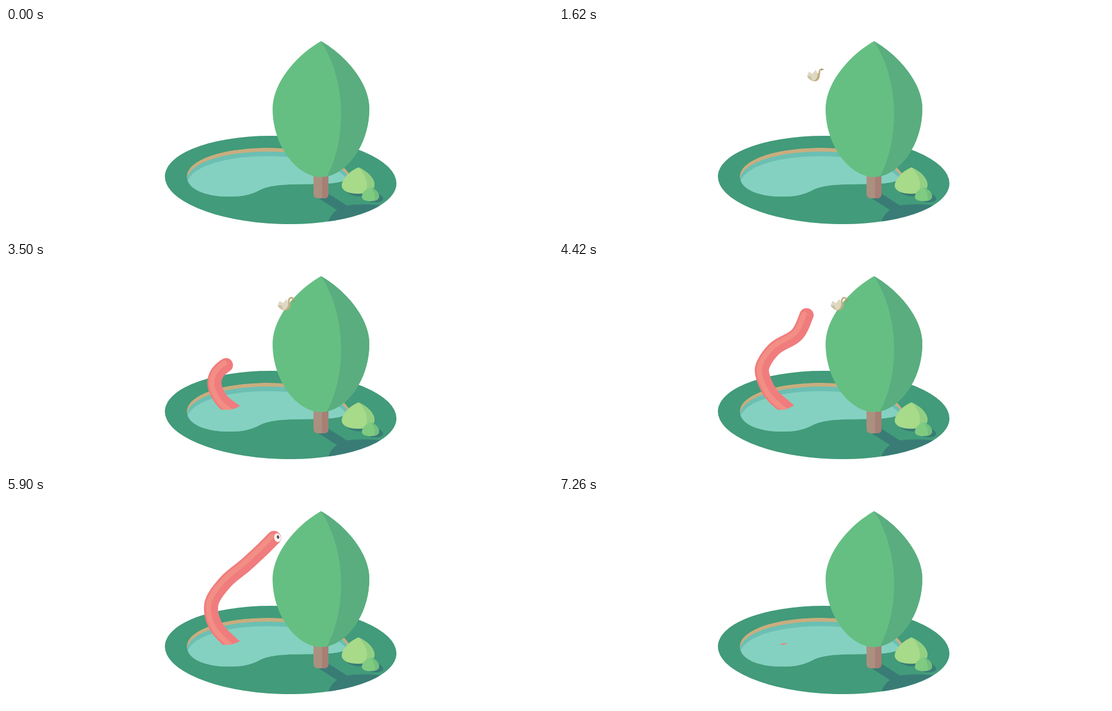
Recreate the animation shown at these times as an HTML page. Size 950 by 361 pixels, loop 7.3 s.

```html
<!DOCTYPE html>
<html lang="en">
<head>
<meta charset="utf-8">
<title>Pond</title>
<style>
  html, body { margin: 0; width: 100%; height: 100%; overflow: hidden; background: #fff; }
  svg { display: block; width: 950px; height: 361px; }
  .line { fill: none; stroke-linecap: round; stroke-linejoin: round; }
</style>
</head>
<body>
<svg viewBox="0 0 950 361">
  <defs>
    <ellipse id="ground" cx="477" cy="265" rx="201.2" ry="76.8" transform="rotate(2 477 265)"/>
    <path id="pond" d="M314 260C314 230 375 209 455 209C530 209 580 226 597 256C598 268 570 271.5 545 272L500 272.5C460 274 450 278 440 283C425 291 410 294 388 294C345 294 316 281 314 260Z"/>
    <path id="crown" d="M547 23C505 47 463 95 463 141C463 205 505 260 547 260C589 260 631 205 631 141C631 95 589 47 547 23Z"/>
    <path id="bigBush" d="M612 243C596 250 583 263 583 276C585 285 596 289 611 289C628 289 640 284 640 273C639 261 628 250 612 243Z"/>
    <path id="smallBush" d="M633 278C624 281 618 288 618 295C619 300 625 302 633 302C642 302 648 299 648 294C648 287 642 281 633 278Z"/>
    <clipPath id="inGround"><use href="#ground"/></clipPath>
    <clipPath id="inPond"><use href="#pond"/></clipPath>
    <clipPath id="inCrown"><use href="#crown"/></clipPath>
    <clipPath id="inBig"><use href="#bigBush"/></clipPath>
    <clipPath id="inSmall"><use href="#smallBush"/></clipPath>
    <clipPath id="aboveWater"><path d="M0 0H950V200L425 235Q408 252 390 256H376Q366 254 350 236L0 200Z"/></clipPath>
  </defs>

  <use href="#ground" fill="#429b7a"/>
  <g clip-path="url(#inPond)">
    <use href="#pond" fill="#c9ad7e"/>
    <use href="#pond" y="6.5" fill="#6bbfb3"/>
    <use href="#pond" y="14.5" fill="#84d1c1"/>
  </g>
  <g clip-path="url(#inGround)" fill="#397c76">
    <path d="M543 297L560 289L592 309.5C610 307 640 306 665 312L650 350L558 345C560 333 566 323 575 317.5Z"/>
    <path d="M590 285C600 294 615 295 626 292L632 303C648 306 656 302 655 297C653 292 648 289 640 285Z"/>
  </g>

  <path d="M534 250H560V289Q560 297 552 297H542Q534 297 534 289Z" fill="#ab9080"/>
  <path d="M549 250H560V289Q560 297 552 297H549Z" fill="#a67f75"/>
  <use href="#crown" fill="#65bf82"/>
  <path clip-path="url(#inCrown)" d="M547 23C568 55 582 100 582 150C582 195 571 235 556 261H640V23Z" fill="#5aad7f"/>

  <use href="#bigBush" fill="#a7da89"/>
  <path clip-path="url(#inBig)" d="M612 243C622 252 627 264 627 274L625 290H645V243Z" fill="#92cf83"/>
  <use href="#smallBush" fill="#7fcb81"/>
  <path clip-path="url(#inSmall)" d="M633 278C639 284 642 293 640 303H650V278Z" fill="#72bf7d"/>

  <g id="bird">
    <path d="M-13 2L9 -4C10 6 6 11 0 11C-7 10 -10 7 -13 2Z" fill="#bfac82"/>
    <path id="neck" class="line" stroke="#c4b189" stroke-width="3"/>
    <path id="beak" d="M-1 -2L5 -.5L0 1.8Z" fill="#a88d60"/>
    <path id="wing" d="M-13 2L-10 -6L-4 -2L2 -9L5 -3C6 3 3 8 -1 10C-7 9 -11 6 -13 2Z" fill="#ded8c3"/>
    <path d="M-13 2L-7 2L-4 8C-8 8 -11 6 -13 2Z" fill="#cbbf9f"/>
  </g>

  <g clip-path="url(#aboveWater)">
    <g id="worm">
      <path id="body" class="line" stroke="#f07c7d" stroke-width="24.5"/>
      <path id="shine" class="line" stroke="#f28e84" stroke-width="9"/>
      <g id="eye">
        <ellipse rx="5.6" ry="7.6" fill="#fff"/>
        <ellipse cx="1.2" cy="-.8" rx="2.2" ry="3.2" fill="#5c5656"/>
      </g>
    </g>
  </g>
</svg>
<script>
const LOOP = 7300, STEP = 40;
const $ = id => document.getElementById(id);
const [bird, neck, beak, wing, worm, body, shine, eye] =
  ['bird', 'neck', 'beak', 'wing', 'worm', 'body', 'shine', 'eye'].map($);
const clamp = v => Math.min(1, Math.max(0, v));
const mix = (a, b, k) => a + (b - a) * k;
const mixPoint = (a, b, k) => [mix(a[0], b[0], k), mix(a[1], b[1], k)];
const toPath = pts => 'M' + pts.map(p => p[0].toFixed(2) + ' ' + p[1].toFixed(2)).join('L');

// Worm centre lines, water to head
const TAIL = [410, 267];
const sunk = y => Array.from({ length: 7 }, () => [393, y]);
const coiled = [[392, 252], [357, 218], [341, 175], [356, 138], [402, 112], [434, 84], [426, 38]];
const strike = [[392, 252], [362, 220], [353, 178], [380, 140], [420, 112], [456, 88], [493, 72]];
const poses = [
  [2640, sunk(270)],
  [3500, [[392, 254], [377, 242], [367, 227], [362, 211], [364, 198], [371, 187], [382, 178]]],
  [4420, [[394, 252], [369, 229], [354, 198], [355, 176], [376, 148], [413, 125], [430, 91]]],
  [5300, coiled],
  [5500, coiled],
  [5700, strike],
  [5780, strike],
  [6180, [[387, 253], [368, 228], [366, 198], [383, 163], [405, 130], [412, 102], [401, 64]]],
  [6260, [[386, 253], [373, 232], [370, 207], [382, 173], [400, 146], [407, 114], [399, 82]]],
  [6940, [[392, 255], [387, 248], [385, 241], [384, 234], [384, 226], [385, 218], [386, 211]]],
  [7260, sunk(265.5)],
  [7300, sunk(272)]
];

function poseAt(t) {
  const i = poses.findIndex(p => p[0] > t);
  const [t0, a] = poses[i - 1], [t1, b] = poses[i];
  const k = (t - t0) / (t1 - t0);
  return a.map((p, j) => mixPoint(p, b[j], k));
}

// Catmull-Rom samples
function spline(pts) {
  const out = [], at = i => pts[Math.min(pts.length - 1, Math.max(0, i))];
  for (let i = 0; i < pts.length - 1; i++) {
    const [a, b, c, d] = [at(i - 1), at(i), at(i + 1), at(i + 2)];
    for (let s = 0; s < 10; s++) {
      const u = s / 10;
      out.push([0, 1].map(n => b[n] + u / 2 * (c[n] - a[n]
        + u * (2 * a[n] - 5 * b[n] + 4 * c[n] - d[n]
        + u * (3 * (b[n] - c[n]) + d[n] - a[n])))));
    }
  }
  out.push(at(pts.length - 1));
  return out;
}

function offset(pts, dist) {
  return pts.map((p, i) => {
    const a = pts[Math.max(0, i - 1)], b = pts[Math.min(pts.length - 1, i + 1)];
    const dx = b[0] - a[0], dy = b[1] - a[1], len = Math.hypot(dx, dy) || 1;
    return [p[0] + dy / len * dist, p[1] - dx / len * dist];
  });
}

function drawWorm(t) {
  const shown = t >= poses[0][0];
  worm.style.display = shown ? '' : 'none';
  if (!shown) return;
  const pts = poseAt(t), line = spline([TAIL, ...pts]), head = pts[6];
  body.setAttribute('d', toPath(line));
  shine.setAttribute('d', toPath(offset(line, 4.5)));
  const open = clamp((t - 4700) / 200);
  eye.setAttribute('transform', `translate(${head[0] + 6} ${head[1] - .5}) rotate(-12) scale(${open})`);
}

function drawBird(t) {
  const shown = t >= 900 && t < 5700;
  bird.style.display = shown ? '' : 'none';
  if (!shown) return;
  const fly = 1 - Math.pow(1 - clamp((t - 900) / 1000), 1.378);
  bird.setAttribute('transform', `translate(${mix(248, 485, fly)} ${mix(95, 72, fly ** 3)})`);

  const flap = t < 1900 ? Math.sin((t - 1620) / 240 * 2 * Math.PI) * .5 : 0;
  wing.setAttribute('transform', `scale(1 ${1 + flap})`);

  const bend = clamp((t - 2300) / 240) * clamp((5100 - t) / 240);
  const nod = bend * Math.sin((t - 3500) / 460 * 2 * Math.PI);
  const at = (a, b) => mixPoint(a, b, bend);
  const tip = at([11.5, -9.5], [14 + nod, -7.5 + nod]);
  neck.setAttribute('d', `M7 1C${at([10, -4], [3, -12])} ${at([6, -9], [13, -15])} ${tip}`);
  beak.setAttribute('transform', `translate(${tip}) rotate(${bend * 70})`);
}

function frame(now) {
  const t = Math.max(0, Math.floor((now % LOOP - 20) / STEP) * STEP + 20);
  drawBird(t);
  drawWorm(t);
  requestAnimationFrame(frame);
}
const start = performance.now();
const tick = () => frame(performance.now() - start);
(function run() {
  const t = Math.max(0, Math.floor(((performance.now() - start) % LOOP - 20) / STEP) * STEP + 20);
  drawBird(t);
  drawWorm(t);
  requestAnimationFrame(run);
})();
</script>
</body>
</html>
```
